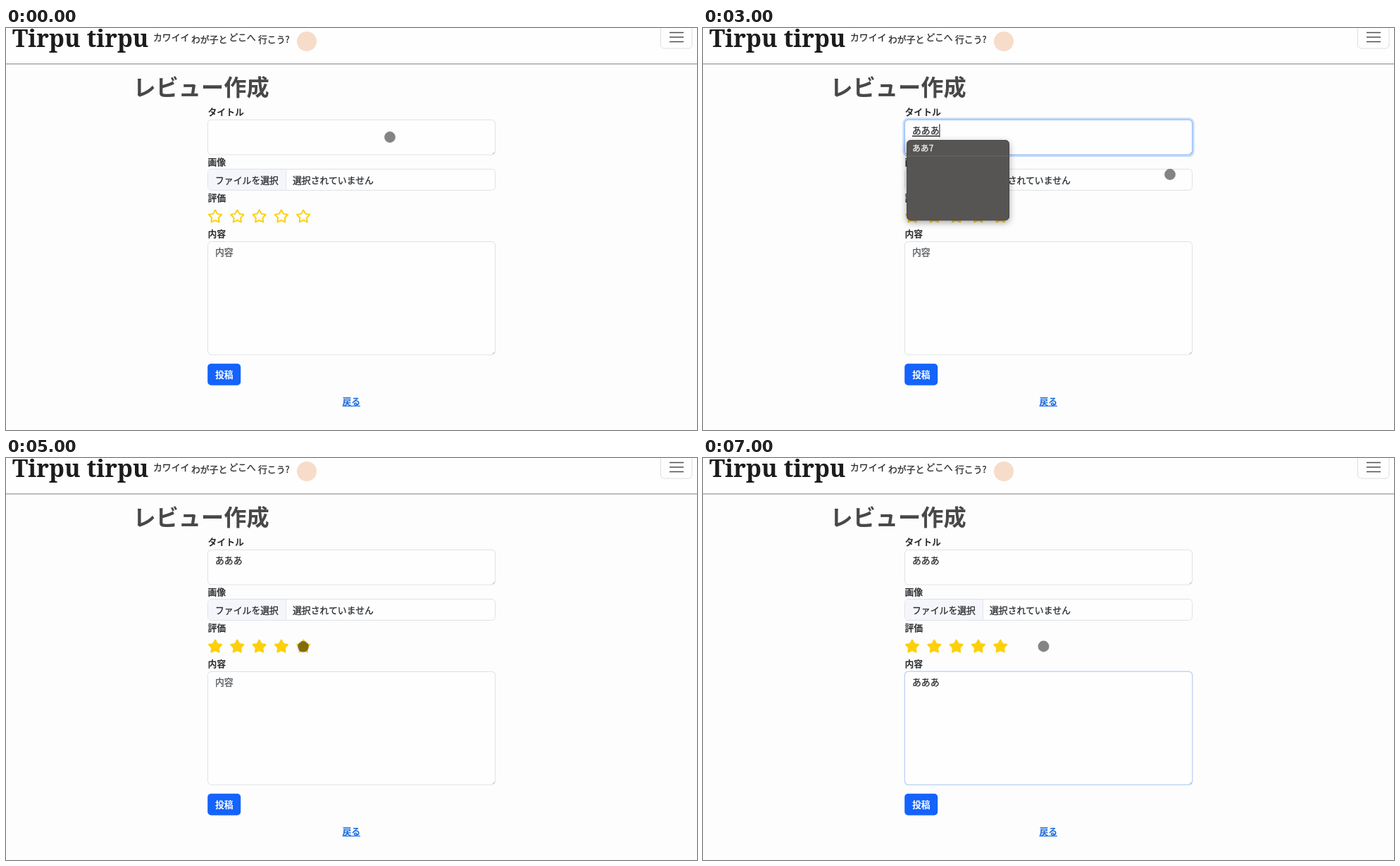
Write an HTML page that moves like this. It is 981 px wide and 571 px high and loops after 7100 ms.

```html
<!DOCTYPE html>
<html lang="ja">
<head>
<meta charset="utf-8">
<title>レビュー作成</title>
<style>
html, body { margin: 0; width: 100%; height: 100%; overflow: hidden; background: #fdfdfd; }
svg { display: block; width: 981px; height: 571px; }
text {
  font: 500 12.85px "Noto Sans CJK JP", "Noto Sans CJK", sans-serif;
  color: #2b2d30; fill: currentColor; stroke: currentColor; stroke-width: .3; white-space: pre;
}
.b, .h1, .brand { font-weight: 700; stroke: none; }
.brand { font: 900 34px "Noto Serif", serif; color: #1c1c1c; }
.h1 { font-size: 32.2px; color: #484848; }
.hint { color: #55595d; }
.row { font-size: 11.85px; color: #f2f2f2; }
.link { color: #1668e0; }
.white { color: #fff; }
.box { fill: #fefefe; stroke: #dee2e6; }
.popup { filter: drop-shadow(0 3px 5px rgba(0,0,0,.35)); }
.badge { filter: drop-shadow(0 2px 4px rgba(20,97,255,.35)); }
</style>
</head>
<body>
<svg viewBox="0 0 981 571">
  <rect width="981" height="50" fill="#fefefe"/>
  <rect y="50" width="981" height="2" fill="#bdbdbd"/>
  <text class="brand" x="9" y="27">Tirpu tirpu</text>
  <g id="tagline"></g>
  <circle cx="427" cy="19" r="14" fill="#f7dcca"/>
  <rect x="929.5" y="-8" width="44.5" height="37" rx="5" fill="none" stroke="#dcdee0"/>
  <path d="M942 6.5h20M942 13h20M942 19.5h20" stroke="#4c4f52" stroke-width="1.6"/>

  <text class="h1" x="180.5" y="96">レビュー作成</text>
  <g id="labels"></g>
  <rect class="box" x="286.5" y="200.5" width="408" height="30" rx="5"/>
  <path d="M397.5 201v29H291a4 4 0 0 1-4-4V205a4 4 0 0 1 4-4z" fill="#f5f6fb"/>
  <path d="M397.5 201v29" stroke="#e2e5ea"/>
  <text x="297" y="220.5">ファイルを選択</text>
  <text x="407" y="220.5">選択されていません</text>
  <g id="stars" stroke="#fdd00b" stroke-width="2" stroke-linejoin="round"></g>
  <rect x="286.2" y="476.8" width="47" height="30.7" rx="5" fill="#1463fb"/>
  <text class="b white" x="297" y="497">投稿</text>
  <text class="b link" x="477.5" y="535">戻る</text>
  <path d="M477.5 537h25.5" stroke="#1668e0" stroke-width="1.2"/>

  <g id="fields"></g>
  <circle id="dot" r="7.9" fill="#000" fill-opacity=".48"/>
  <path id="arrow" d="M0 0v11.5l2.7-2.5 1.9 4.200 2-.9-1.900-4.100h3.600z" fill="#111" stroke="#fff" stroke-width=".9"/>
</svg>
<script>
const LOOP = 7100, STEP = 100;
const $ = id => document.getElementById(id);
const clamp = v => Math.max(0, Math.min(1, v));
const fill = (id, items, html) => $(id).innerHTML = items.map(html).join('');

fill('tagline', [['カワイイ', 209, 18], ['わが子と', 263, 20.5], ['どこへ', 316.5, 18], ['行こう?', 358, 20.5]],
  ([s, x, y]) => `<text x="${x}" y="${y}">${s}</text>`);
fill('labels', [['タイトル', 124], ['画像', 194.5], ['評価', 245.5], ['内容', 297]],
  ([s, y]) => `<text class="b" x="286.5" y="${y}">${s}</text>`);

const star = Array.from({ length: 10 }, (_, i) => {
  const a = Math.PI * (i / 5 - .5), r = i % 2 ? 5.1 : 9.5;
  return [r * Math.cos(a), r * Math.sin(a)].map(v => v.toFixed(2));
}).join(' ');
fill('stars', [0, 1, 2, 3, 4],
  i => `<polygon points="${star}" transform="translate(${297 + i * 31.3} 268)"/>`);

// Both text areas share one layout, shifted down by dy.
const rowH = 22.7;
const rows = [0, 1, 2].map(i => `<g class="cand">
  <text class="row" x="297" y="${175.3 + i * rowH}"></text>
  <path d="M290 ${182 + i * rowH}h144" stroke="#6b6a69"/></g>`).join('');

const fields = [
  { dy: 0, h: 50, hint: '', on: 1200, off: 3400, keys: [2500, 2700, 2900], commit: 3200, badge: [1700, 2500] },
  { dy: 173, h: 161, hint: '内容', on: 5600, off: 6900, keys: [5800, 6000, 6200], commit: 6500, badge: [0, 0] }
];
const lists = [[], ['ああ', 'ああいう', '嗚呼'], ['ああいう', 'ああ言えばこう言う', 'アア溶岩'], ['ああ7']];

for (const f of fields) {
  const g = document.createElementNS('http://www.w3.org/2000/svg', 'g');
  const bottom = 130 + f.h;
  g.setAttribute('transform', `translate(0 ${f.dy})`);
  g.innerHTML = `<rect class="ring" fill="#c1dafe"/>
    <rect class="box" x="286.5" y="130.5" width="408" height="${f.h - .5}" rx="5"/>
    <rect class="edge" x="286.5" y="130.5" width="408" height="${f.h - .5}" rx="5" fill="none" stroke="#8ebcfe"/>
    <path d="M691 ${bottom - 1}l2.500-2.500" stroke="#999" stroke-width=".8"/>
    <text class="val" x="297" y="150.3"></text>
    <path class="under" stroke="#222" stroke-width="1.3"/>
    <path class="caret" stroke="#333" stroke-width="1.2"/>
    <g class="badge"><rect x="285" y="157" width="24" height="18" rx="9" fill="#1a6cfa"/>
      <text class="b white" x="297" y="169.3" text-anchor="middle" style="font-size:8.5px">あ</text></g>
    <g class="popup"><rect x="289.5" y="159.5" width="145" height="113.5" rx="5" fill="#565553" stroke="#494846"/>${rows}</g>`;
  $('fields').append(g);
  const q = s => g.querySelector(s);
  Object.assign(f, {
    ring: q('.ring'), edge: q('.edge'), val: q('.val'), under: q('.under'),
    caret: q('.caret'), tip: q('.badge'), popup: q('.popup'), cands: [...g.querySelectorAll('.cand')]
  });
}

const show = (el, on) => el.style.display = on ? '' : 'none';
const attrs = (el, o) => { for (const k in o) el.setAttribute(k, o[k]); };

function drawField(f, t) {
  const p = clamp((t - f.on) / 150) * (1 - clamp((t - f.off) / 150));
  const o = p * 3;
  attrs(f.ring, { x: 286.5 - o, y: 130.5 - o, width: 408 + 2 * o, height: f.h - .5 + 2 * o, rx: 5 + o });
  f.edge.style.opacity = p;

  const n = f.keys.filter(k => t >= k).length;
  const end = 297 + n * 12.85;
  const composing = n > 0 && t < f.commit;
  const badge = t >= f.badge[0] && t < f.badge[1];
  f.val.textContent = n ? 'あ'.repeat(n) : f.hint;
  f.val.classList.toggle('hint', !n);
  show(f.under, composing);
  f.under.setAttribute('d', `M297 153.5H${end}`);

  const focused = t >= f.on && t < f.off;
  show(f.caret, focused && (composing || badge || (t - f.on) % 1000 < 500));
  f.caret.setAttribute('d', `M${end + .3} 136.5v18.5`);
  show(f.tip, badge);

  show(f.popup, composing);
  f.cands.forEach((c, i) => {
    const s = lists[n][i];
    show(c, s);
    c.firstElementChild.textContent = s || '';
  });
}

const path = [
  [0, 545, 155], [1300, 545, 155], [1400, 541, 162.5], [2600, 541, 162.5], [3000, 663, 208],
  [3300, 687, 226], [3600, 670, 240], [4000, 506, 268], [4300, 367, 277], [4500, 375, 270],
  [4800, 422, 268], [5000, 422, 268], [5500, 416.5, 360.5], [6500, 416.5, 360.5], [7000, 483.5, 267.5]
];

function cursorAt(t) {
  const i = Math.max(1, path.findIndex(k => k[0] >= t));
  const [a, b] = [path[i - 1], path[i]];
  const u = clamp((t - a[0]) / (b[0] - a[0]));
  return [a[1] + (b[1] - a[1]) * u, a[2] + (b[2] - a[2]) * u];
}

function draw(t) {
  fields.forEach(f => drawField(f, t));
  $('stars').setAttribute('fill', t >= 4900 ? '#fdd00b' : 'none');
  const arrow = t >= 1400 && t < 2700 || t >= 5700 && t < 6600;
  const move = { transform: `translate(${cursorAt(t).join(' ')})` };
  attrs($('dot'), move);
  attrs($('arrow'), move);
  show($('dot'), !arrow);
  show($('arrow'), arrow);
}

const start = performance.now();
function tick() {
  const t = (performance.now() - start) % LOOP;
  draw(Math.floor(t / STEP) * STEP);
  requestAnimationFrame(tick);
}
tick();
</script>
</body>
</html>
```
